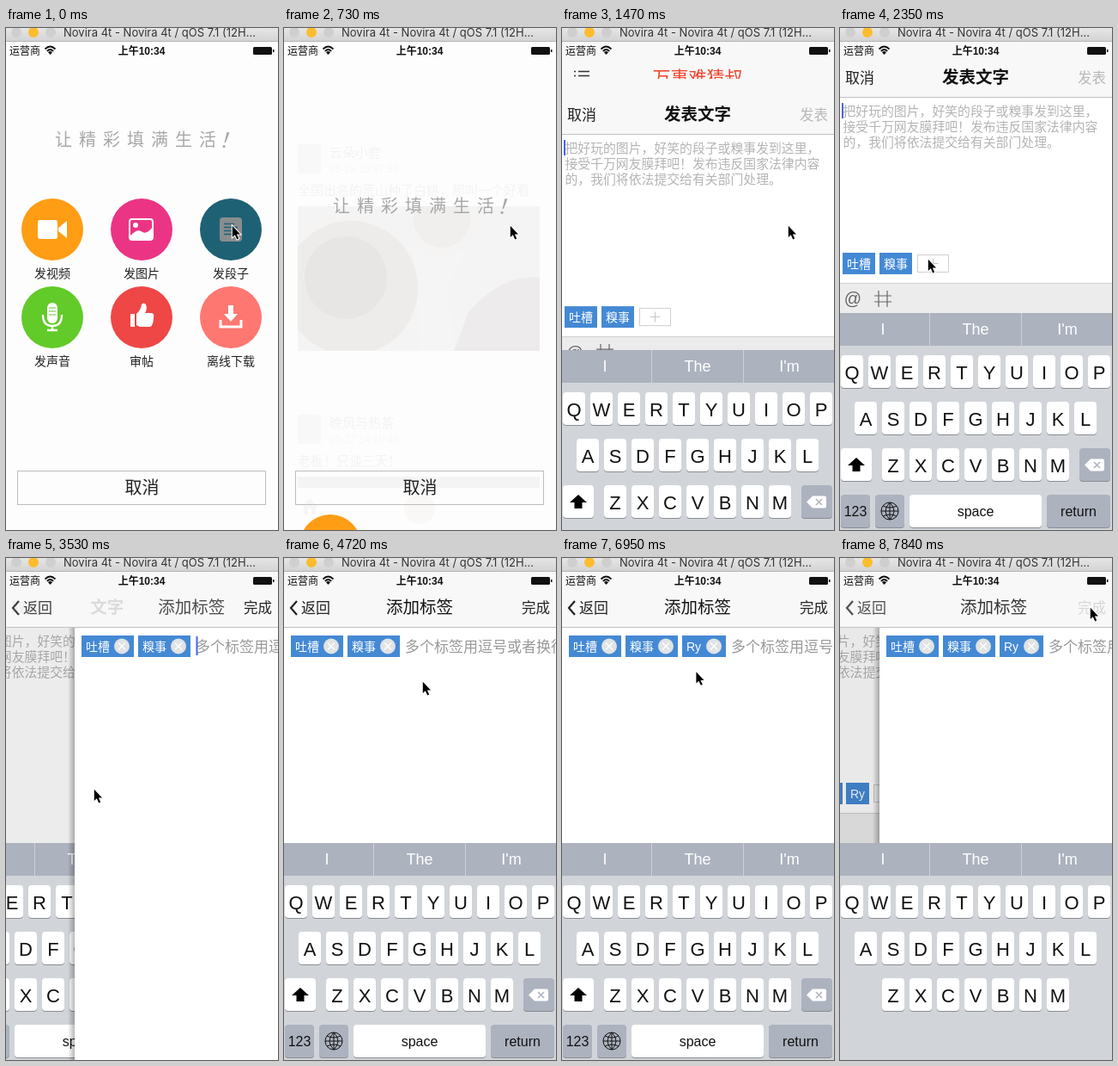
These frames come from a looping animation (317x583 px, 7.99 s). An HTML page with a canvas:

```html
<!DOCTYPE html>
<html lang="zh">
<head>
<meta charset="utf-8">
<style>
html, body { margin: 0; width: 100%; height: 100%; overflow: hidden; background: #fdfdfd; }
canvas { display: block; width: 100vw; height: 100vh; }
</style>
</head>
<body>
<canvas></canvas>
<script>
const W = 317, H = 583, LOOP = 7990, TICK = 148, LAST = 53;
const MODAL_START = 1102, PUSH_START = 3313, KEYS_START = 3850, POP_START = 7784;
const canvas = document.querySelector('canvas');
const scale = Math.max(1, window.devicePixelRatio || 1);
canvas.width = W * scale;
canvas.height = H * scale;
const g = canvas.getContext('2d');
g.scale(scale, scale);

const SANS = '"Liberation Sans", "Noto Sans CJK SC", "Noto Sans CJK", sans-serif';
const MAC = 'Inter, Roboto, sans-serif';
const BLUE = '#4489d4', KEY_GRAY = '#acb2be', CARET = '#4666e0';

// drawing helpers
function text(str, x, y, size, color, { align = 'left', weight = 400, font = SANS } = {}) {
  g.font = `${weight} ${size}px ${font}`;
  g.textAlign = align;
  g.fillStyle = color;
  g.fillText(str, x, y + size * 0.37);
}
const center = (str, x, y, size, color, weight) => text(str, x, y, size, color, { align: 'center', weight });
function rect(x, y, w, h, color) {
  g.fillStyle = color;
  g.fillRect(x, y, w, h);
}
function round(x, y, w, h, r, color) {
  g.fillStyle = color;
  g.beginPath();
  g.roundRect(x, y, w, h, r);
  g.fill();
}
function disc(x, y, r, color) {
  g.fillStyle = color;
  g.beginPath();
  g.arc(x, y, r, 0, 7);
  g.fill();
}
function fill(path, color) {
  g.fillStyle = color;
  g.fill(new Path2D(path));
}
function stroke(path, color, width = 1) {
  g.strokeStyle = color;
  g.lineWidth = width;
  g.stroke(new Path2D(path));
}
function group(dx, dy, draw, alpha = 1) {
  g.save();
  g.translate(dx, dy);
  g.globalAlpha *= alpha;
  draw();
  g.restore();
}
function clip(x, y, w, h) {
  g.beginPath();
  g.rect(x, y, w, h);
  g.clip();
}

// easing
function ease(x) {
  if (x <= 0 || x >= 1) return x <= 0 ? 0 : 1;
  const curve = (u, a, b) => 3 * u * (1 - u) ** 2 * a + 3 * u * u * (1 - u) * b + u ** 3;
  let lo = 0, hi = 1;
  for (let i = 0; i < 20; i++) {
    const mid = (lo + hi) / 2;
    if (curve(mid, 0.25, 0.25) < x) lo = mid; else hi = mid;
  }
  return curve(lo, 0.1, 1);
}
function spring(ms) {
  const s = Math.max(0, ms) * 0.0112;
  const p = 1 - (1 + s) * Math.exp(-s);
  return p > 0.996 ? 1 : p;
}

// window frame and status bar
function titleBar() {
  const shade = g.createLinearGradient(0, 0, 0, 16);
  shade.addColorStop(0, '#e6e6e6');
  shade.addColorStop(1, '#d2d2d2');
  rect(0, 0, W, 16, shade);
  rect(0, 15, W, 1, '#b4b4b4');
  ['#cfcfcf', '#fdbc2e', '#cfcfcf'].forEach((color, i) => disc(12 + 20 * i, 5, 6, color));
  text('Novira 4t - Novira 4t / qOS 7.1 (12H...', 67, 5.5, 13, '#333', { font: MAC });
}
function statusBar() {
  text('运营商', 4, 26.5, 12, '#111');
  stroke('M45.5 24.5Q51.5 18.5 57.5 24.5M47.8 27Q51.5 23 55.2 27', '#111', 1.8);
  fill('M49 28.2Q51.5 26 54 28.2L51.5 31Z', '#111');
  center('上午10:34', 158, 26.5, 12, '#111', 600);
  round(288, 22, 22, 9, 1.5, '#111');
  rect(311, 25, 1.5, 3, '#111');
}
function navBar() {
  rect(0, 16, W, 64, '#f8f8f8');
  rect(0, 80, W, 1, '#c2c2c2');
}

// feed behind the menu
function feedCell(y, name, date, body) {
  round(16, y + 13, 27, 34, 3, '#a9a5a2');
  text(name, 53, y + 22, 15, '#333');
  text(date, 53, y + 42, 12, '#888');
  text(body, 16, y + 66, 15, '#333');
}
function feed() {
  rect(0, 16, W, H, '#fff');
  feedCell(122, '云朵小鹿', '05-28 19:37:33', '全国出名的荒山种了白桃，那叫一个好看');
  rect(16, 207, 282, 168, '#5d5650');
  g.save();
  clip(16, 207, 282, 168);
  disc(78, 300, 82, '#e8e2da');
  disc(78, 302, 78, '#57504a');
  disc(72, 290, 48, '#85796c');
  disc(184, 226, 38, '#e8e2da');
  disc(184, 222, 33, '#8f8578');
  fill('M150 250Q184 280 218 250L190 300L200 375L160 375Z', '#f6f3ee');
  fill('M215 330Q255 285 298 290V375H198Z', '#4d4843');
  g.restore();
  text('1397播放', 294, 215, 12, '#fff', { align: 'right' });
  text('01:27', 298, 367, 12, '#fff', { align: 'right' });
  feedCell(436, '晚风与热茶', '05-27 14:10:49', '老板！只谈三天！');
  rect(16, 521, 282, 13, '#5d5650');
  rect(0, 534, W, 49, '#f7f7f7');
  fill('M20 556L30 546L40 556H37V565H32V558H28V565H23V556Z', '#777');
  disc(158, 558, 18, '#c8908a');
  stroke('M158 548V568M148 558H168', '#fff', 4);
}
function feedNav() {
  navBar();
  stroke('M19 50.5H32M19 55.5H32M19 60.5H32M14 50.5H16M14 55.5H16M14 60.5H16', '#333', 1.4);
  center('万事难猜叔', 158, 57.5, 21, '#f0432a', 500);
}

// publish menu
const ICONS = [
  c => { round(37, 223, 23, 22, 3, c); fill('M61 232L71 224V244L61 236Z', c); },
  c => {
    g.strokeStyle = c; g.lineWidth = 2;
    g.beginPath(); g.roundRect(144, 222, 27, 24, 3); g.stroke();
    disc(151, 229, 3, c);
    fill('M145 241Q154 232 159 237Q164 240 171 231V246H145Z', c);
  },
  (c, back) => {
    round(249, 220, 26, 28, 4, c);
    stroke('M254 227.5H266M254 231.5H270M254 235.5H270M254 239.5H266', back, 1.6);
  },
  (c, back) => {
    round(48, 319, 12, 24, 6, c);
    stroke('M50 325H58M50 329H58M50 333H58', back, 1);
    stroke('M43 333Q43 346 54 346Q65 346 65 333M54 346V351M48 351H60', c, 2.4);
  },
  c => {
    rect(145, 332, 5, 15, c);
    fill('M152 332Q157 328 158 321Q160 318 163 321Q165 326 162 331H170Q173 332 172 336Q172 345 168 347H156L152 345Z', c);
  },
  c => {
    fill('M259 322H265V332H270L262 341L254 332H259Z', c);
    stroke('M250 339V347H274V339', c, 3);
  },
];
const BUTTONS = [
  ['发视频', '#ff9d14'], ['发图片', '#ec3485'], ['发段子', '#39b4d5'],
  ['发声音', '#62ca29'], ['审帖', '#ef4646'], ['离线下载', '#ff7771'],
];
const DROP = 562, FALL = 400, STAGGER = 100, FIRST_FALL = 88;
const fallen = (t, order) => DROP * ease((t - FIRST_FALL - order * STAGGER) / FALL);

function slogan() {
  [...'让精彩填满生活'].forEach((ch, i) => center(ch, 67 + 28 * i, 130, 20, '#a8a8a8'));
  fill('M257.5 121L260.5 121.5L256 133H254.5Z', '#a8a8a8');
  disc(254, 137.5, 1.6, '#a8a8a8');
}
function menu(t, tick) {
  rect(0, 16, W, H, '#fdfdfd');
  if (tick > 1) {
    group(0, 0, () => { clip(16, 120, 282, H); feed(); }, 0.05);
  }
  g.strokeStyle = '#bdbdbd';
  g.lineWidth = 1;
  g.strokeRect(13.5, 514.5, 289, 39);
  center('取消', 158.5, 534, 20, '#222');
  BUTTONS.forEach(([label, color], i) => group(0, fallen(t, 5 - i), () => {
    const x = 54 + 104 * (i % 3), y = i < 3 ? 234 : 336;
    const pressed = tick === 0 && i === 2;
    const back = pressed ? '#1f6174' : color;
    disc(x, y, 36, back);
    ICONS[i](pressed ? '#8a8d8f' : '#fff', back);
    center(label, x, y + 51, 14, '#222');
  }));
  group(0, fallen(t, 6.02), slogan);
}

// keyboard
const DEFAULT_HINTS = [['I', 50, 'center'], ['The', 158, 'center'], ["I'm", 265, 'center']];
const R_HINTS = [['“R”', 50, 'center'], ['eally', 174, 'right'], ['pigal', 247, 'left']];
const RY_HINTS = [['“Ry”', 50, 'center'], ['ally', 174, 'right'], ['pig', 247, 'left']];

function key(x, y, w, label, { color = '#fff', size = 22, ink = '#111' } = {}) {
  round(x, y + 1, w, 38, 4, '#898c91');
  round(x, y, w, 38, 4, color);
  center(label, x + w / 2, y + 19.5, size, ink);
}
function hints(list, alpha, typing) {
  g.save();
  g.globalAlpha *= alpha;
  list.forEach(([str, x, align], i) => text(str, x, 349, 18, typing && i === 1 ? '#1b78dd' : '#fff', { align }));
  g.restore();
}
function keyboard({ typed = '', fading = false, bare = false } = {}) {
  rect(0, 331, W, 252, '#d1d5da');
  rect(0, 331, W, 38, KEY_GRAY);
  if (typed) rect(104, 331, 107, 38, '#eceeef');
  rect(104, 331, 1, 38, '#cdd1d8');
  rect(211, 331, 1, 38, '#cdd1d8');
  if (fading) hints(R_HINTS, 0.35, true);
  hints(!typed ? DEFAULT_HINTS : typed === 'R' ? R_HINTS : RY_HINTS, 1, typed);
  ['QWERTYUIOP', 'ASDFGHJKL', 'ZXCVBNM'].forEach((row, r) =>
    [...row].forEach((ch, i) => key([1, 17, 49][r] + 32 * i, 380 + 54 * r, 26, ch)));
  if (bare) return;
  const gray = { color: KEY_GRAY, size: 16 };
  key(1, 488, 36, '', { color: typed ? KEY_GRAY : '#fff' });
  fill('M19 499L29 508H23.5V515H14.5V508H9Z', typed ? '#fff' : '#000');
  key(279, 488, 36, '', gray);
  fill('M285 507.5L292 500.5H306Q308 500.5 308 502.5V512.5Q308 514.5 306 514.5H292Z', '#fff');
  stroke('M296 504L303 511M303 504L296 511', KEY_GRAY, 1.5);
  key(1, 542, 34, '123', gray);
  key(41, 542, 34, '', gray);
  stroke('M48 561a10 10 0 1 0 20 0a10 10 0 1 0-20 0M48 561H68M58 551V571M58 551Q48 561 58 571M58 551Q68 561 58 571M50 555Q58 559 66 555M50 567Q58 563 66 567', '#111', 1);
  key(81, 542, 154, 'space', { size: 16 });
  key(241, 542, 74, 'return', gray);
}

// compose screen
function compose(lift, tagged, caret) {
  rect(0, 81, W, H, '#fff');
  ['把好玩的图片，好笑的段子或糗事发到这里，', '接受千万网友膜拜吧！发布违反国家法律内容', '的，我们将依法提交给有关部门处理。']
    .forEach((line, i) => text(line, 3.5, 97 + 18 * i, 14.85, '#b4b4b4'));
  if (caret) rect(2, 87, 2, 18, CARET);
  group(0, 252 * (1 - lift), () => {
    const plus = tagged ? 121 : 91;
    const tags = [['吐槽', 3, 38], ['糗事', 46, 38]];
    if (tagged) tags.push(['Ry', 88, 27]);
    for (const [label, x, w] of tags) {
      rect(x, 261, w, 25, BLUE);
      center(label, x + w / 2, 273.5, 14, '#fff');
    }
    g.strokeStyle = '#cfcfcf';
    g.lineWidth = 1;
    g.strokeRect(plus - 0.5, 263.5, 36, 20);
    stroke(`M${plus + 11.5} 273.5h12m-6-6v12`, '#c4c4c4');
    rect(0, 296, W, 300, '#ececec');
    rect(0, 296, W, 1, '#cfcfcf');
    center('@', 15, 314, 20, '#666');
    stroke('M45 305V324M55 305V324M40 311H60M40 318H60', '#666', 1.2);
  });
}
const composeTitle = () => center('发表文字', 158, 57, 19.5, '#111', 600);
function composeNav() {
  text('取消', 6, 58, 17, '#222');
  composeTitle();
  text('发表', 277, 58, 16.5, '#b8b8b8');
}

// tag screen
function tag(label, x, w) {
  rect(x, 90, w, 25, BLUE);
  text(label, x + 5, 102.5, 14, '#fff');
  const cx = x + w - 14;
  disc(cx, 102.5, 9, '#e1e3e5');
  stroke(`M${cx - 4} 98.5l8 8m0-8l-8 8`, '#fff', 1.3);
}
function tagScreen({ typed, tagged, caret, pressed }) {
  rect(0, 81, W, H, '#fff');
  tag('吐槽', 8, 61);
  tag('糗事', 74, 61);
  if (tagged) tag('Ry', 140, 51);
  const x = tagged ? 196 : 140;
  if (typed) text(typed, x, 103, 17, '#111');
  else text('多个标签用逗号或者换行隔开', x + 1, 103, 17, '#999');
  if (caret) rect(x + (typed ? (typed === 'R' ? 12 : 20) : 1.5), 91, 2, 22, CARET);
  if (typed) {
    rect(8, 125, 300, 35, pressed ? '#356fae' : BLUE);
    text('添加标签: ' + typed, 18, 143, 14, '#fff');
  }
}
function edgeShadow(x) {
  const shade = g.createLinearGradient(x - 8, 0, x, 0);
  shade.addColorStop(0, 'rgba(0,0,0,0)');
  shade.addColorStop(1, 'rgba(0,0,0,.28)');
  rect(x - 8, 16, 8, H, shade);
}
function tagNav(open, popping, done) {
  navBar();
  group(-80 * open, 0, () => {
    clip(97 + 80 * open, 16, W, 64);
    composeTitle();
  }, popping ? (1 - open) ** 4 : (1 - open) * 0.5);
  group(0, 0, () => text('取消', 6, 58, 17, '#222'), (1 - open) ** 2);
  group(0, 0, () => {
    stroke('M15 50L8 58L15 66', '#222', 2.2);
    text('返回', 20, 58, 17, '#222');
  }, popping ? open ** 1.5 : open ** 0.5);
  group((popping ? 144 : 230) * (1 - open), 0, () => center('添加标签', 158, 57, 19.5, '#111', 500), open);
  text('完成', 277, 58, 16.5, done ? '#d6d6d6' : '#222');
}

// pointer: tick, x, y
const POINTER = [
  [0, 263, 229], [12, 263, 229], [16, 102, 268], [25, 102, 268], [29, 164, 145], [31, 161, 143], [33, 161, 143],
  [36, 110, 398], [37, 110, 398], [39, 173, 398], [41, 147, 371], [43, 140, 140], [46, 140, 140], [51, 290, 58], [53, 291, 57],
];
function pointer(tick) {
  const i = Math.max(1, POINTER.findIndex(p => p[0] >= tick));
  const [t0, x0, y0] = POINTER[i - 1], [t1, x1, y1] = POINTER[i];
  const u = (tick - t0) / (t1 - t0), s = u * u * (3 - 2 * u);
  group(x0 + (x1 - x0) * s, y0 + (y1 - y0) * s, () => {
    const arrow = 'M0.8 0.8V14L3.8 11.2L6.2 16.4L8.2 15.5L5.9 10.5H10Z';
    stroke(arrow, '#fff', 2);
    fill(arrow, '#000');
  });
}

function drawTagFlow(t, tick) {
  const popping = t >= POP_START;
  const open = popping ? 1 - spring(t - POP_START) : spring(t - PUSH_START);
  const typed = tick < 37 || tick > 45 ? '' : tick < 40 ? 'R' : 'Ry';
  const tagged = tick > 45;
  const x = Math.round(W * (1 - open)), shift = Math.round(-95 * open);
  const blink = typed || tick % 7 < 4;

  group(shift, 0, () => compose(popping ? 1 : 1 - open, tagged, false));
  rect(0, 16, W, H, `rgba(0,0,0,${0.1 * open})`);
  if (!popping && open < 1) group(shift, 0, () => keyboard());
  if (open < 1) edgeShadow(x);
  group(x, 0, () => tagScreen({ typed, tagged, caret: blink && !popping, pressed: tick === 45 }));
  if (popping || open === 1) {
    const rise = spring(t - KEYS_START);
    group(0, 252 * (1 - rise), () => keyboard({ typed, fading: tick === 41, bare: popping }));
  }
  tagNav(open, popping, tick >= 52);
}

function draw(tick) {
  const t = tick * TICK;
  g.clearRect(0, 0, W, H);
  if (t < MODAL_START) {
    menu(t, tick);
  } else if (t < PUSH_START) {
    const p = spring(t - MODAL_START);
    if (p < 1) { feed(); feedNav(); }
    group(0, Math.round(567 * (1 - p)), () => {
      navBar();
      composeNav();
      compose(p, false, tick % 7 < 4);
      keyboard();
    });
  } else {
    drawTagFlow(t, tick);
  }
  statusBar();
  titleBar();
  pointer(tick);
}

const start = performance.now();
let shown = -1;
function frame() {
  const time = (performance.now() - start) % LOOP;
  const tick = Math.min(LAST, Math.floor((time + 24) / TICK));
  if (tick !== shown) draw(shown = tick);
  requestAnimationFrame(frame);
}
frame();
</script>
</body>
</html>
```
